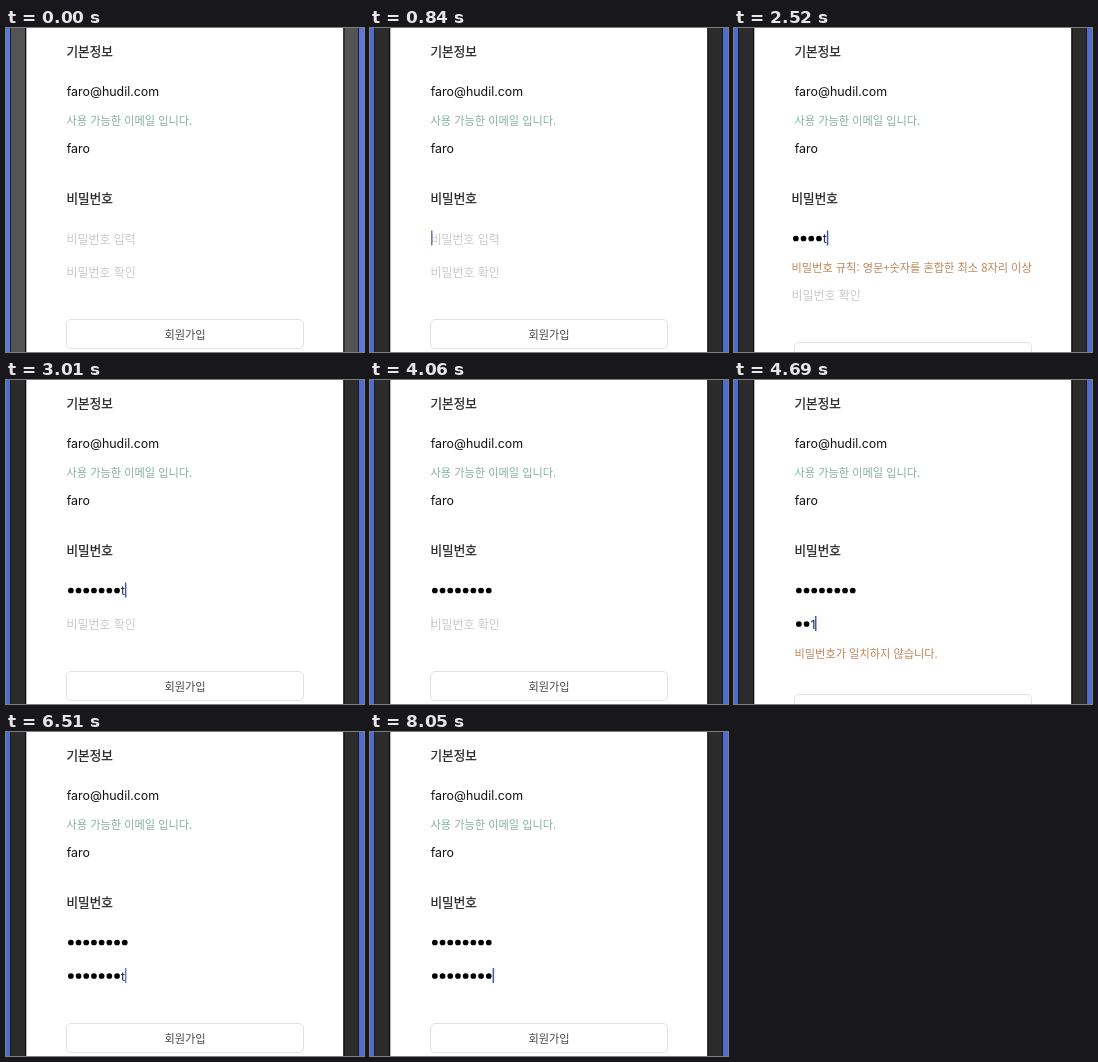
Recreate the animation shown at these times as an HTML page. Size 358 px wide and 324 px high, loop 8400 ms.

```html
<!DOCTYPE html>
<html lang="ko">
<head>
<meta charset="utf-8">
<title>회원가입</title>
<style>
html, body { margin: 0; width: 100%; height: 100%; overflow: hidden; background: #fff; }
svg { display: block; width: 358px; height: 324px; }
text { font-family: "Noto Sans CJK KR", "Noto Sans CJK", sans-serif; font-size: 11.2px; }
.label { font-size: 12.6px; fill: #222; stroke: #222; stroke-width: 0.25; }
.value { font-family: Inter, sans-serif; font-size: 12.4px; fill: #111; }
.key { font-family: Inter, sans-serif; font-size: 12.2px; fill: #1d2240; }
.hint { font-size: 11.95px; fill: #cacaca; }
.ok { fill: #84b0a0; }
.bad { fill: #c08558; }
.dots { fill: #000; }
.caret { fill: #4a5bab; }
</style>
</head>
<body>
<svg viewBox="0 0 358 324">
  <rect id="edge" width="358" height="324"/>
  <rect x="4" width="349" height="324" fill="#1c1c1c"/>
  <rect id="bezel" x="5" width="347" height="324"/>
  <rect x="19" width="319.5" height="324" fill="#0c0c0c"/>
  <rect x="20.3" width="316.9" height="324" fill="#fff"/>

  <text class="label" x="60.5" y="28">기본정보</text>
  <text class="value" x="60.7" y="68.3">faro@hudil.com</text>
  <text class="ok" x="60.5" y="96.7">사용 가능한 이메일 입니다.</text>
  <text class="value" x="60.7" y="125">faro</text>

  <g id="group">
    <text class="label" x="60.5" y="174.7">비밀번호</text>
    <g id="first"><text class="hint" x="60.5" y="215.5">비밀번호 입력</text></g>
    <text id="rule" class="bad" x="60.5" y="243.5" font-size="11.3">비밀번호 규칙: 영문+숫자를 혼합한 최소 8자리 이상</text>
    <g id="second"><text class="hint" x="60.5" y="249.4">비밀번호 확인</text></g>
  </g>
  <text id="mismatch" class="bad" x="60.5" y="277.7">비밀번호가 일치하지 않습니다.</text>
  <g id="button">
    <rect x="60.5" y="291.5" width="237" height="29" rx="4.5" fill="#fff" stroke="#e2e2e2"/>
    <text x="179" y="311" text-anchor="middle" fill="#4a4a4a">회원가입</text>
  </g>
</svg>
<script>
const LOOP = 8400, STEP = 70, PITCH = 7.7, LEFT = 61;
const SECRET = "1111test";
const KEYS = [1260, 1470, 1750, 1960, 2520, 2660, 2800, 3010];
const RETYPE = 2940;                       // delay of the second field's typing
const KEY_WIDTH = { 1: 4.6, t: 4, e: 7, s: 6.3 };
const FADE_OUT = [0.8, 0.4, 0.12, 0];
const FADE_IN = [0.35, 0.7, 1];
const BLINKS = [
  [0, [0]], [280, FADE_IN], [840, FADE_OUT], [1260, [1]],
  [3920, FADE_OUT], [4200, [1]], [6510, FADE_OUT],
  [7000, FADE_IN], [7560, FADE_OUT], [8050, [1]]
];

const $ = id => document.getElementById(id);
const show = (el, on) => el.setAttribute("visibility", on ? "visible" : "hidden");
const move = (el, x, y) => el.setAttribute("transform", `translate(${x} ${y})`);

function add(parent, tag, attrs) {
  const el = document.createElementNS("http://www.w3.org/2000/svg", tag);
  for (const k in attrs) el.setAttribute(k, attrs[k]);
  return parent.appendChild(el);
}

function makeField(id, y, delay, maskAt) {
  const box = $(id);
  const dots = [...SECRET].map((_, i) =>
    add(box, "circle", { class: "dots", cx: LEFT + PITCH * (i + 0.5), cy: y, r: 2.85 }));
  const key = add(box, "text", { class: "key", y: y + 4.6 });
  const caret = add(box, "rect", { class: "caret", y: y - 8, width: 1.5, height: 15 });
  return { box, hint: box.firstElementChild, dots, key, caret, delay, maskAt };
}

function drawField(f, t, focused, alpha) {
  const count = KEYS.filter(k => t >= k + f.delay).length;
  const masked = t >= f.maskAt ? count : Math.max(0, count - 1);
  const char = masked < count ? SECRET[masked] : "";
  const x = LEFT + masked * PITCH;
  show(f.hint, !count);
  f.dots.forEach((d, i) => show(d, i < masked));
  f.key.textContent = char;
  f.key.setAttribute("x", x);
  f.caret.setAttribute("x", x + (KEY_WIDTH[char] || 0));
  f.caret.setAttribute("opacity", focused ? alpha : 0);
}

function caretAlpha(t) {
  const [start, levels] = BLINKS.filter(b => t >= b[0]).pop();
  return levels[Math.min(levels.length - 1, Math.floor((t - start) / STEP))];
}

const first = makeField("first", 210.5, 0, 3360);
const second = makeField("second", 244, RETYPE, 8050);

function draw(t) {
  const dim = t < 840;
  $("edge").setAttribute("fill", dim ? "#5d79de" : "#4f6dcd");
  $("bezel").setAttribute("fill", dim ? "#545454" : "#2b2b2b");

  const weak = t >= KEYS[0] && t < KEYS[7];
  const differs = t >= KEYS[0] + RETYPE && t < KEYS[7] + RETYPE;
  show($("rule"), weak);
  show($("mismatch"), differs);
  move($("group"), weak ? -3 : 0, 0);
  move(second.box, 0, weak ? 23 : 0);
  move($("button"), 0, weak || differs ? 23 : 0);

  const alpha = caretAlpha(t);
  drawField(first, t, t < 3360, alpha);
  drawField(second, t, t >= 3360, alpha);
}

const origin = performance.now();
function tick() {
  draw((performance.now() - origin) % LOOP);
  requestAnimationFrame(tick);
}
tick();
</script>
</body>
</html>
```
